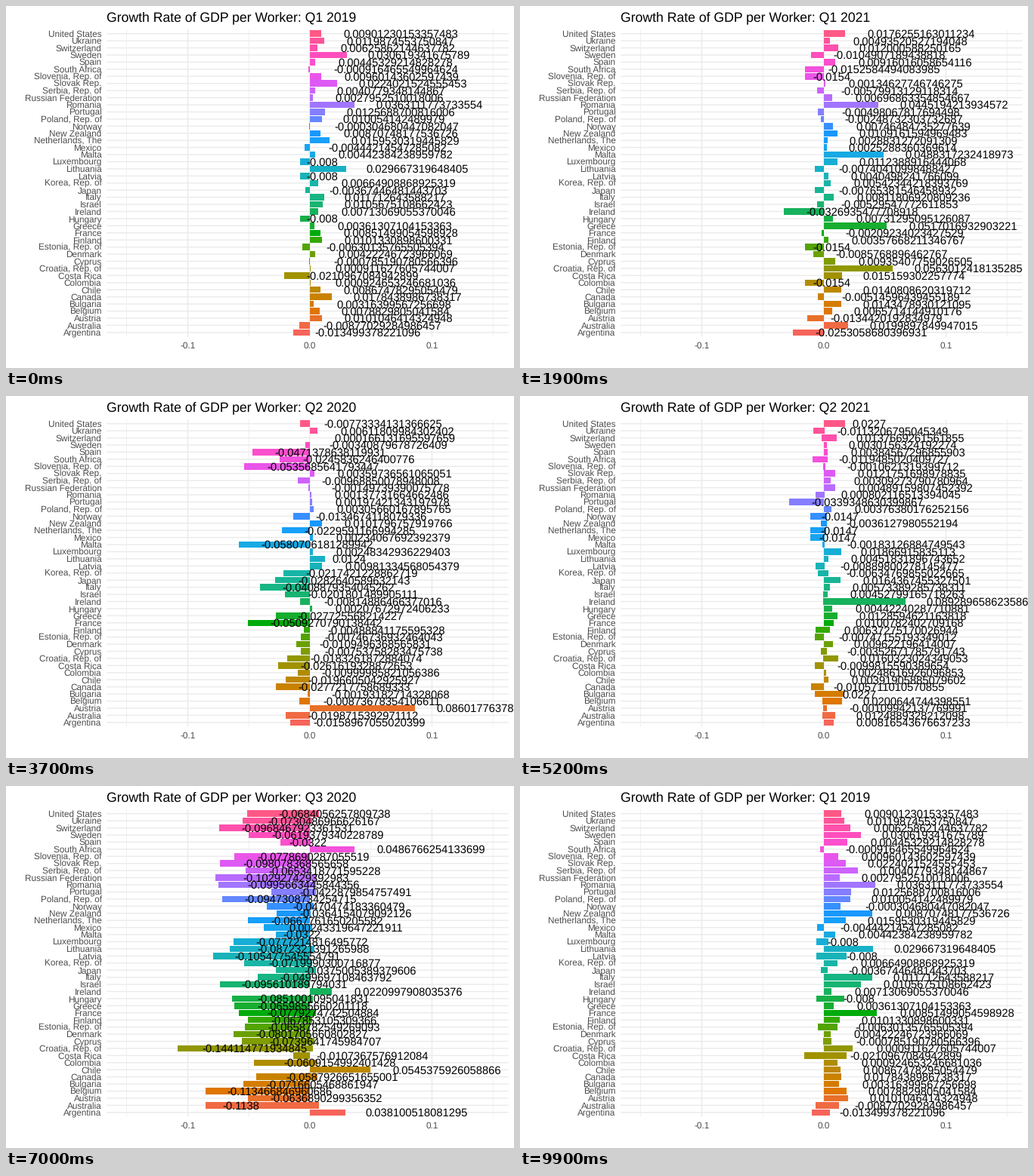
Animation, 672 px wide and 480 px high, one loop 10000 ms. Source, as a matplotlib script:

```python
import numpy as np
import matplotlib.pyplot as plt
from matplotlib.animation import FuncAnimation
from matplotlib.patches import Rectangle

plt.rcParams["font.family"] = "Liberation Sans"
plt.rcParams["text.hinting"] = "none"

W, H, DPI = 672, 480, 96
LEFT, RIGHT, TOP, BOTTOM = 133.1, 664.67, 31.04, 438.5
LOW, HIGH = -0.1515, 0.1477
PAD = 0.05 * (HIGH - LOW)
LABEL_PT, AXIS_PT, TITLE_PT = 11.04, 8.8, 13.2
CAP = 0.358  # half the capital height, in em

COUNTRIES = """United States|Ukraine|Switzerland|Sweden|Spain|South Africa|Slovenia, Rep. of
Slovak Rep.|Serbia, Rep. of|Russian Federation|Romania|Portugal|Poland, Rep. of|Norway
New Zealand|Netherlands, The|Mexico|Malta|Luxembourg|Lithuania|Latvia|Korea, Rep. of|Japan
Italy|Israel|Ireland|Hungary|Greece|France|Finland|Estonia, Rep. of|Denmark|Cyprus
Croatia, Rep. of|Costa Rica|Colombia|Chile|Canada|Bulgaria|Belgium|Austria|Australia
Argentina""".replace("\n", "|").split("|")
N = len(COUNTRIES)
rng = np.random.default_rng(7)
rates = {}


def row(name):
    name = name.replace("_", " ")
    return next(i for i, country in enumerate(COUNTRIES) if country.startswith(name))


def quarter(name, mean, spread, **standouts):
    """Random growth around a mean, in thousandths, plus the standout countries."""
    values = mean + spread * np.clip(rng.normal(size=N), -1.7, 1.7)
    for country, value in standouts.items():
        values[row(country)] = value + rng.uniform(-0.04, 0.04)
    rates[name] = values / 1000


quarter("Q1 2019", 9, 10, Romania=36.3, Sweden=30.6, Lithuania=29.7,
        Costa_Rica=-21.1, Argentina=-13.5, Australia=-8.8)
quarter("Q1 2020", 3, 9, Ireland=-68.7)
quarter("Q1 2021", 5, 12, Croatia=56.3, Greece=51.7, Malta=48.8, Romania=44.5,
        Ireland=-32.7, Argentina=-25.3)
quarter("Q2 2019", 4, 9)
quarter("Q2 2020", -8, 12, Austria=86, Malta=-58.1, Slovenia=-53.6, France=-50.9,
        Spain=-47.1, Italy=-40.9)
quarter("Q2 2021", 4, 11, Ireland=89.3, Portugal=-33.9)
quarter("Q3 2019", 2, 8, Bulgaria=-29.5, Finland=-28.2, Romania=-26.7, Russian=21.7)
quarter("Q3 2020", -73, 24, Chile=54.5, South_Africa=48.7, Argentina=38.1,
        Ireland=22.1, Mexico=2.4, Costa_Rica=-10.7, Croatia=-144.1)
quarter("Q3 2021", 4, 15, Mexico=-151.5, Greece=-49, Chile=35.3)
quarter("Q4 2019", 1, 7, Argentina=22.7, Serbia=21.7, Slovenia=16.1,
        Croatia=-22.8, Russian=-17.2, Latvia=-15.7)
quarter("Q4 2020", 52, 28, France=147.7, New_Zealand=133, Italy=124,
        Mexico=-10, South_Africa=-9)

QUARTERS = list(rates)
LABELS = {q: [f"{v:.15g}" for v in values] for q, values in rates.items()}


def hue_color(degrees, lum=65, chroma=100):
    """Polar LUV colour, slightly darkened in the midtones."""
    h = np.radians(degrees)
    u = chroma * np.cos(h) / (13 * lum) + 0.19784
    v = chroma * np.sin(h) / (13 * lum) + 0.46834
    y = ((lum + 16) / 116) ** 3
    x, z = 9 * y * u / (4 * v), y * (12 - 3 * u - 20 * v) / (4 * v)
    rgb = np.array([[3.2406, -1.5372, -0.4986],
                    [-0.9689, 1.8758, 0.0415],
                    [0.0557, -0.2040, 1.0570]]) @ [x, y, z]
    rgb = np.clip(rgb, 0, 1)
    rgb = np.where(rgb > 0.0031308, 1.055 * rgb ** (1 / 2.4) - 0.055, 12.92 * rgb)
    rgb = np.clip(rgb, 0, 1) ** 1.22
    if 130 < degrees < 250:
        rgb[0] = max(rgb[0], 0.09)
    return rgb


def to_px(rate):
    return LEFT + (rate - LOW + PAD) / (HIGH - LOW + 2 * PAD) * (RIGHT - LEFT)


def px(points):
    return points * DPI / 72


def label_width(text):
    digits = sum(c.isdigit() for c in text)
    return px(LABEL_PT) * (0.5562 * digits + 0.278 + 0.333 * text.startswith("-"))


fig = plt.figure(figsize=(W / DPI, H / DPI), dpi=DPI, facecolor="white")
ax = fig.add_axes([0, 0, 1, 1])
ax.set(xlim=(0, W), ylim=(H, 0))
ax.axis("off")
panel = Rectangle((LEFT, TOP), RIGHT - LEFT, BOTTOM - TOP, transform=ax.transData)

STEP = (BOTTOM - TOP) / (N + 0.2)
ROWS = TOP + STEP * (0.6 + np.arange(N))


def grid(xs, ys, width):
    ax.plot(xs, ys, color="#EBEBEB", lw=width, solid_capstyle="butt", snap=False, zorder=1)


def axis_text(x, y, text, ha):
    ax.text(x, y + CAP * px(AXIS_PT), text, ha=ha, va="baseline",
            size=AXIS_PT, color="#4D4D4D")


for tick in (-0.15, -0.05, 0.05, 0.15):
    grid([to_px(tick)] * 2, [TOP, BOTTOM], 0.533)
for y, country in zip(ROWS, COUNTRIES):
    grid([LEFT, RIGHT], [y, y], 1.067)
    axis_text(LEFT - 6.6, y, country, "right")
for tick in (-0.1, 0.0, 0.1):
    grid([to_px(tick)] * 2, [TOP, BOTTOM], 1.067)
    axis_text(to_px(tick), 449.3, f"{tick:.1f}", "center")

title = ax.text(LEFT, 20, "", size=TITLE_PT, va="baseline")
bars, labels = [], []
for i, y in enumerate(ROWS):
    color = hue_color(15 + 350 * (N - 1 - i) / N)
    bars.append(ax.add_patch(Rectangle((0, y - 0.45 * STEP), 0, 0.9 * STEP, fc=color,
                                       lw=0, snap=True, zorder=2)))
    label = ax.text(0, y + CAP * px(LABEL_PT), "", size=LABEL_PT, va="baseline", zorder=3)
    label.set_clip_path(panel)
    labels.append(label)


def locate(frame):
    """Quarter being left, quarter being entered and linear progress."""
    k = max(0, min((frame - 5) // 10, 2) if frame < 34 else (frame - 7) // 9)
    start, steps = (5 + 10 * k, 5 if k < 2 else 4) if k < 3 else (7 + 9 * k, 4)
    progress = np.clip((frame - start + 1) / steps, 0, 1)
    return QUARTERS[k], QUARTERS[(k + 1) % len(QUARTERS)], progress


def draw(frame):
    old, new, t = locate(frame)
    shown = new if t >= 0.5 else old
    title.set_text(f"Growth Rate of GDP per Worker: {shown}")

    def blend(part):
        return to_px((1 - t) * part(rates[old]) + t * part(rates[new]))

    lows = blend(lambda v: np.minimum(v, 0))
    highs = blend(lambda v: np.maximum(v, 0))
    anchors = blend(lambda v: v)
    for bar, label, lo, hi, x, text in zip(bars, labels, lows, highs, anchors, LABELS[shown]):
        bar.set_x(lo)
        bar.set_width(hi - lo)
        label.set_text(text)
        label.set_x(x + 0.2 * label_width(text))
    return [title, *bars, *labels]


anim = FuncAnimation(fig, draw, frames=100, interval=100, repeat=True, repeat_delay=0)
plt.show()
```
